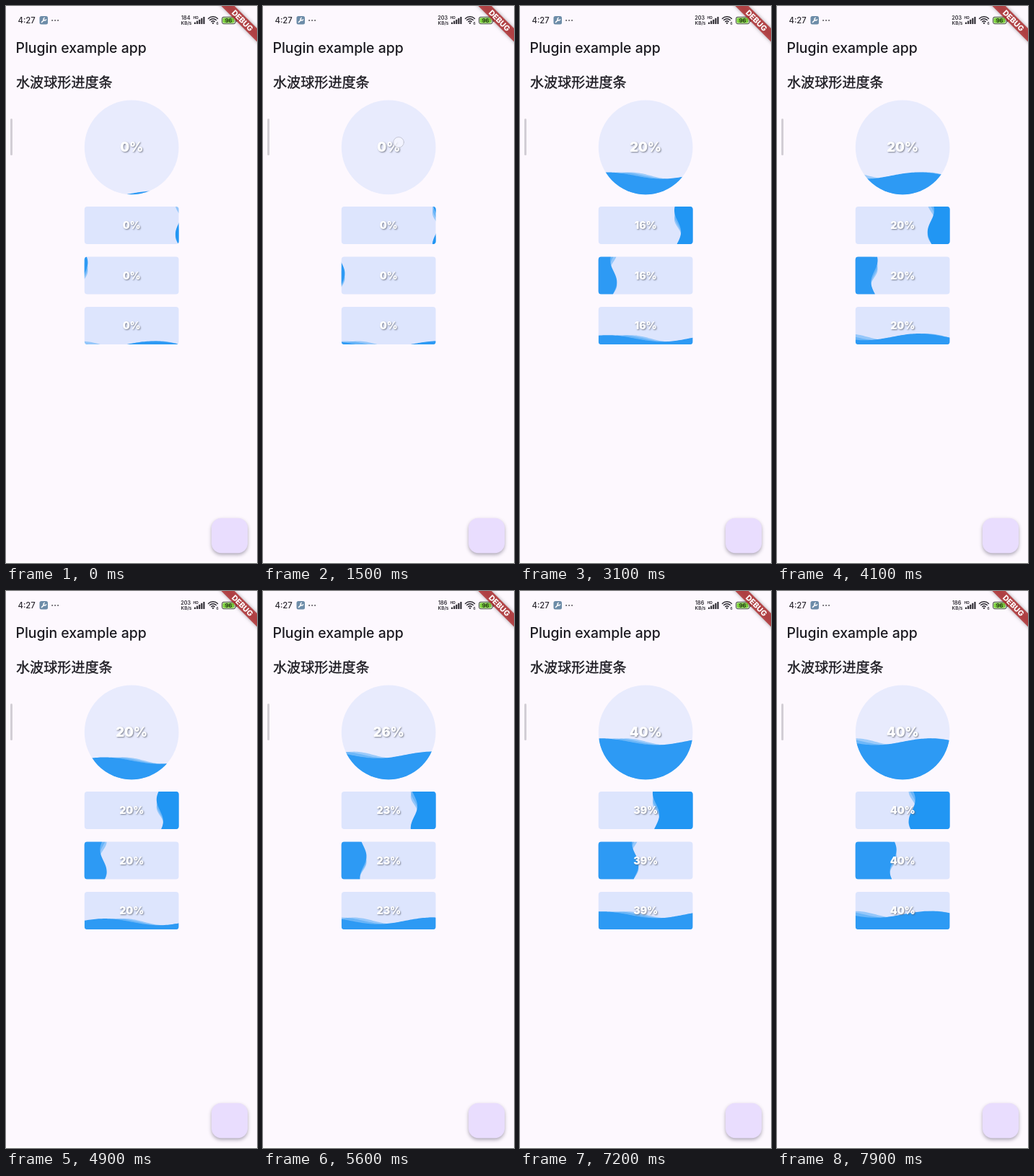
Write an HTML page with a canvas that moves like this. It is 348 by 772 pixels and loops after 8 s.

```html
<!DOCTYPE html>
<html lang="en">
<head>
<meta charset="utf-8">
<title>Wave progress</title>
<style>
  html, body { margin: 0; width: 100%; height: 100%; overflow: hidden; background: #fdf8fe; }
  canvas { display: block; width: 348px; height: 772px; }
</style>
</head>
<body>
<canvas id="stage"></canvas>
<script>
const W = 348, H = 772, LOOP = 8000, STEP = 100;
const LEFT = 108.8, WIDTH = 130.7, CX = 174.2;
const TAPS = [1500, 5300];
const SANS = 'Inter, Roboto, sans-serif';
const canvas = document.getElementById('stage');
const ctx = canvas.getContext('2d');
const scale = window.devicePixelRatio || 1;
canvas.width = W * scale;
canvas.height = H * scale;

function text(str, x, y, font, color = '#1b1a20', align = 'left') {
  ctx.font = font;
  ctx.fillStyle = color;
  ctx.textAlign = align;
  ctx.fillText(str, x, y);
}

function box(x, y, w, h, r, color) {
  ctx.beginPath();
  ctx.roundRect(x, y, w, h, r);
  ctx.fillStyle = color;
  ctx.fill();
}

function shadow(color, blur, dx, dy) {
  ctx.shadowColor = color;
  ctx.shadowBlur = blur * scale;
  ctx.shadowOffsetX = dx * scale;
  ctx.shadowOffsetY = dy * scale;
}

// Each tap adds 20 %, spread evenly over the given duration.
function progress(t, duration) {
  return TAPS.reduce((sum, tap) => sum + 0.2 * Math.min(1, Math.max(0, (t - tap) / duration)), 0);
}

// One liquid layer; spread bends its phase away from the front layer.
function wave(y, h, side, value, t, spread, color) {
  const trough = 0.2 - t / 2000;
  const right = LEFT + WIDTH, bottom = y + h;
  ctx.beginPath();
  for (let i = 0; i <= 60; i++) {
    const f = i / 60;
    const phase = 0.5 + (f - 0.5) / 1.15 - trough - spread * (1 - f);
    const off = 4.6 * Math.cos(2 * Math.PI * phase);
    if (side === 'bottom') ctx.lineTo(LEFT + f * WIDTH, bottom - value * h + off);
    else if (side === 'right') ctx.lineTo(right - value * WIDTH + off, y + f * h);
    else ctx.lineTo(LEFT + value * WIDTH + off, y + f * h);
  }
  const far = side === 'left' ? LEFT - 9 : right + 9;
  if (side === 'bottom') {
    ctx.lineTo(right, bottom + 9);
    ctx.lineTo(LEFT, bottom + 9);
  } else {
    ctx.lineTo(far, bottom);
    ctx.lineTo(far, y);
  }
  ctx.closePath();
  ctx.fillStyle = color;
  ctx.fill();
}

function gauge(y, h, radius, back, side, value, t, size) {
  ctx.save();
  box(LEFT, y, WIDTH, h, radius, back);
  ctx.clip();
  wave(y, h, side, value, t, 0.32, 'rgba(33,150,243,.38)');
  wave(y, h, side, value, t, 0.16, 'rgba(33,150,243,.38)');
  wave(y, h, side, value, t, 0, side === 'right' ? '#2196f3' : '#2d9af4');
  ctx.restore();
  ctx.save();
  shadow('rgba(90,95,110,.75)', 2, 1, 1);
  text(Math.round(value * 100) + '%', CX, y + h / 2 + size * 0.36, `900 ${size}px ${SANS}`, '#fff', 'center');
  ctx.restore();
}

function statusBar(t) {
  text('4:27', 16.5, 24, `500 11.3px ${SANS}`, '#2b2930');
  box(46.5, 14, 11.5, 11.5, 2.5, '#6d8ca8');
  ctx.strokeStyle = '#fff';
  ctx.lineCap = 'round';
  ctx.lineWidth = 1.6;
  ctx.beginPath();
  ctx.moveTo(49.5, 22.5);
  ctx.lineTo(53, 19);
  ctx.stroke();
  ctx.lineWidth = 1.3;
  ctx.beginPath();
  ctx.arc(53.8, 18.2, 1.9, 0.2, 4.5);
  ctx.stroke();
  for (let i = 0; i < 3; i++) box(63.2 + i * 4, 19, 1.8, 1.8, 1, '#3a383f');

  const speed = t < 1000 ? 184 : t < 5000 ? 203 : 186;
  text(speed, 249.2, 19.3, `600 7.2px ${SANS}`, '#2b2930', 'center');
  text('KB/s', 250, 25.8, `600 6.5px ${SANS}`, '#2b2930', 'center');
  text('HD', 259.5, 18.2, `700 5px ${SANS}`, '#2b2930');
  for (let i = 0; i < 5; i++) {
    const h = 2.5 + i * 1.9;
    box(261 + i * 3.1, 25 - h, 2.1, h, 0.6, '#2b2930');
  }
  ctx.strokeStyle = '#2b2930';
  ctx.lineWidth = 1.4;
  for (const r of [3.2, 6.2, 9.2]) {
    ctx.beginPath();
    ctx.arc(287, 24, r, -Math.PI * 0.75, -Math.PI * 0.25);
    ctx.stroke();
  }
  box(286, 22.5, 2, 2.5, 1, '#2b2930');
  text('6', 291.5, 25.6, `600 5px ${SANS}`, '#2b2930');

  box(299, 14.8, 19.6, 10.4, 3.4, '#4b5248');
  box(300, 15.8, 17.6, 8.4, 2.5, '#dff0cf');
  box(300.6, 16.4, 15.8, 7.2, 2, '#7bd03c');
  box(319, 18, 1.5, 4, 0.7, '#4b5248');
  text('96', 308.6, 22.9, `700 7.5px ${SANS}`, '#26351c', 'center');
}

function ribbon() {
  ctx.save();
  ctx.translate(W, 0);
  ctx.rotate(Math.PI / 4);
  shadow('rgba(0,0,0,.45)', 5, 0, 0);
  box(-40, 22, 80, 13, 0, 'rgba(177,38,40,.78)');
  shadow('transparent', 0, 0, 0);
  text('DEBUG', 0, 32.3, `800 10.5px ${SANS}`, '#fff', 'center');
  ctx.restore();
}

function draw(t) {
  ctx.setTransform(scale, 0, 0, scale, 0, 0);
  ctx.fillStyle = '#fdf8fe';
  ctx.fillRect(0, 0, W, H);
  ctx.fillStyle = '#fff';
  ctx.fillRect(0, 770, W, 2);

  statusBar(t);
  text('Plugin example app', 13.5, 65, `500 19.4px ${SANS}`);
  text('水波球形进度条', 14, 113, '500 19.1px "Noto Sans CJK SC", "Noto Sans CJK", sans-serif');
  ctx.strokeStyle = '#1b1a20';
  ctx.lineWidth = 0.35;
  ctx.strokeText('水波球形进度条', 14, 113);
  box(6, 156, 3, 51, 1.5, '#d2ced5');

  gauge(130.5, 130.7, 65.35, '#e8ebfd', 'bottom', progress(t, 1000), t, 18.2);
  const value = progress(t, 2000);
  ['right', 'left', 'bottom'].forEach((side, i) =>
    gauge(278 + i * 69.5, 52.1, 4, '#dde5fd', side, value, t, 14.2));

  ctx.save();
  shadow('rgba(60,50,80,.4)', 5, 0, 2.5);
  box(285, 709.7, 50, 48.5, 13.5, '#e9ddfe');
  ctx.restore();

  if (TAPS.some(tap => t >= tap - 100 && t < tap + 100)) {
    ctx.beginPath();
    ctx.arc(188, 189, 7.3, 0, 2 * Math.PI);
    ctx.fillStyle = 'rgba(245,246,255,.8)';
    ctx.fill();
    ctx.strokeStyle = 'rgba(150,150,165,.45)';
    ctx.lineWidth = 1;
    ctx.stroke();
  }
  ribbon();
}

function tick() {
  draw(Math.floor(performance.now() % LOOP / STEP) * STEP);
  requestAnimationFrame(tick);
}
tick();
</script>
</body>
</html>
```
